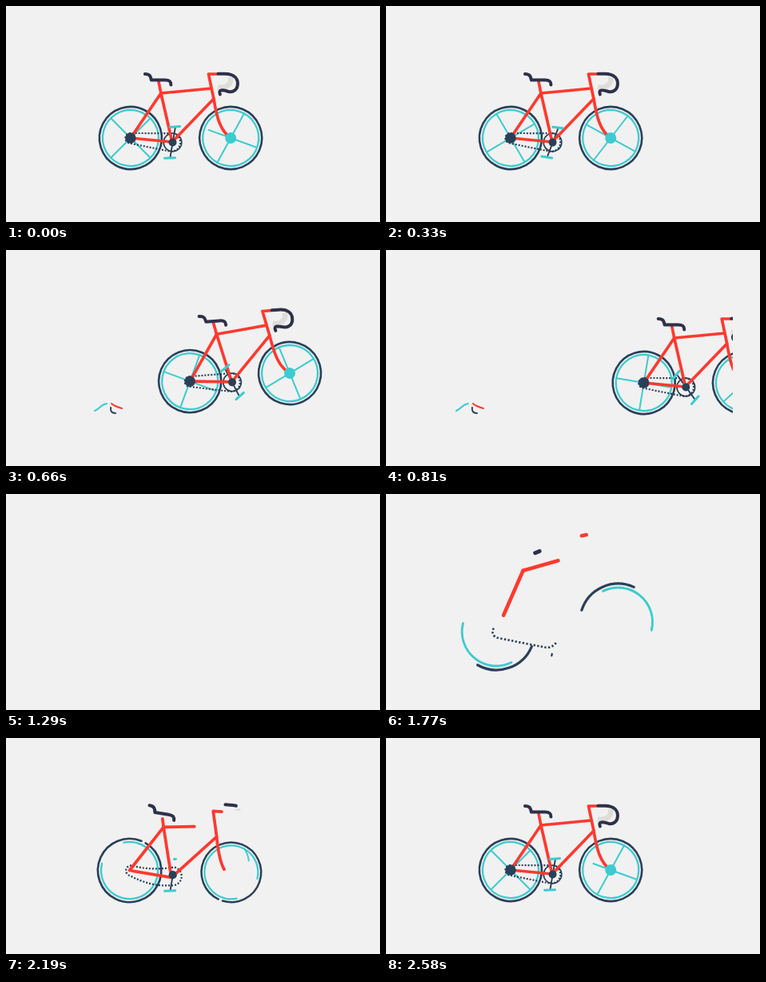
Recreate the animation shown at these times as an HTML page. Size 468x270 px, loop 2610 ms.

```html
<!DOCTYPE html>
<html lang="en">
<head>
<meta charset="utf-8">
<title>Bicycle loop</title>
<style>
  html, body { margin: 0; width: 100%; height: 100%; overflow: hidden; background: #f1f1f1; }
  svg { display: block; width: 468px; height: 270px; clip-path: inset(0 34px); }
  path { fill: none; stroke-linecap: round; stroke-linejoin: round; }
</style>
</head>
<body>
<svg id="stage" viewBox="0 0 468 270"></svg>
<script>
const LOOP = 2610, REBUILD = 1290;
const RED = '#ff392e', TEAL = '#3ccbd0', NAVY = '#2a4059', DARK = '#2e314a', GREY = '#dfddd9';

const { PI, sin, cos, max, min, exp, round } = Math;
const clamp = v => min(1, max(0, v));
const ramp = (t, at, time) => clamp((t - at) / time);
const ease = (t, at, time) => {
  const u = ramp(t, at, time);
  return u * u * (3 - 2 * u);
};
const pop = (t, at, time) => {
  const u = ramp(t, at, time) - 1;
  return 1 + 2.7 * u ** 3 + 1.7 * u ** 2;
};
const decay = (t, time) => exp(-((max(0, t) / time) ** 3));

function add(parent, tag, attrs = {}) {
  const el = document.createElementNS('http://www.w3.org/2000/svg', tag);
  for (const name in attrs) el.setAttribute(name, attrs[name]);
  return parent.appendChild(el);
}
const group = parent => add(parent, 'g');
const line = (parent, stroke, width, d = '') =>
  add(parent, 'path', { d, stroke, 'stroke-width': width, pathLength: 1 });
const place = (el, x, y, rot = 0, sx = 1, sy = sx) =>
  el.setAttribute('transform', `translate(${x} ${y}) rotate(${rot}) scale(${sx} ${sy})`);

function trim(el, a, b) {
  const full = b - a > 0.999;
  el.style.display = b - a < 0.004 ? 'none' : '';
  el.style.strokeDasharray = full ? 'none' : `${b - a} 3`;
  el.style.strokeDashoffset = full ? 0 : -a;
}

// A stroke that grows out of the point `seed` (0..1) towards both ends.
const strokes = [];
function grow(el, at, time, seed = 0, rate = ease) {
  strokes.push({ el, at, time, seed, rate });
  return el;
}
function drawStrokes(t) {
  for (const { el, at, time, seed, rate } of strokes) {
    const g = rate(t, at, time);
    trim(el, seed * (1 - g), seed + (1 - seed) * g);
  }
}

// An arc that grows around `deg`, `back` being the share drawn backwards.
function arc(el, r, deg, back, g) {
  const a = deg - 360 * back * g, b = deg + 360 * (1 - back) * g;
  const at = d => `${r * cos(d * PI / 180)} ${r * sin(d * PI / 180)}`;
  const to = d => `A${r} ${r} 0 0 1 ${at(d)}`;
  el.style.display = g < 0.004 ? 'none' : '';
  el.setAttribute('d', `M${at(a)}${to((a + b) / 2)}${to(b)}`);
}

const stage = document.getElementById('stage');
const sparks = group(stage);
const sparkLines = [
  line(sparks, TEAL, 2, 'M-17 1Q-13 -1 -10 -4T-2 -8'),
  line(sparks, NAVY, 2, 'M3 -3Q2 4 9 4'),
  line(sparks, RED, 2, 'M4 -8Q7 -5 17 -2')
];
const bike = group(stage);

function wheel() {
  const g = group(bike), spin = group(g);
  return {
    g, spin,
    spokes: [line(spin, TEAL, 2), line(spin, TEAL, 2)],
    tyre: line(g, NAVY, 2.6), rim: line(g, TEAL, 2.3)
  };
}
const rear = wheel(), front = wheel();
grow(rear.spokes[0], 2220, 210);
grow(rear.spokes[1], 2260, 240);
grow(front.spokes[0], 2120, 240);
grow(front.spokes[1], 2330, 340);

const chain = group(bike);
const links = add(chain, 'path', { stroke: NAVY, 'stroke-width': 2.2, pathLength: 160 });
links.style.strokeLinecap = 'butt';

const crank = group(bike), ring = line(crank, NAVY, 1.7);
grow(line(crank, NAVY, 1.9, 'M-3 18.5L3.3 -18.5'), 1730, 840, 0, ramp);

const frame = group(bike), body = group(frame);
body.setAttribute('transform', 'translate(-156 -165)');
const tube = (d, ...timing) => grow(line(body, RED, 3.7, d), ...timing);
tube('M194 109L156 165', 1440, 500);
tube('M194 109L231 105.5', 1440, 320);
tube('M231 105.5L257 103', 2170, 200);
tube('M191 94L194 109L208 170L156 165', 1800, 460, .6);
tube('M208 170L260 116', 1850, 300);
tube('M264 85H253.5L260 116C264 140 268 155 281 165', 1680, 665);

const seat = group(body);
grow(line(seat, DARK, 4, 'M-18 -7.5C-12 -7.5 -11 -5 -10 0H7C13 0 14.5 2 14.5 6'), 1700, 330, .48);
const bars = group(body);
const hood = grow(line(bars, GREY, 6.5, 'M281 89C283 97 276 104 265 101.5'), 2140, 280);
hood.style.strokeLinecap = 'butt';
grow(line(bars, DARK, 4,
  'M265.5 84.8H274C286 85 290 91 290 97C290 105 284 108 279 107C273 105.5 265 103 268 110.5'), 2110, 280);

const pedals = group(bike);
grow(line(pedals, TEAL, 3, 'M-10 19.8L3 19.2'), 1900, 220);
grow(line(pedals, TEAL, 3, 'M-3.5 -19L9 -20'), 2160, 130, .5);

const disc = (parent, fill) => add(parent, 'circle', { fill });
const rearHub = disc(rear.hub = group(bike), NAVY);
const frontHub = disc(front.hub = group(bike), TEAL);
const axle = disc(pedals, NAVY);

function drawWheel(w, t, x, y, s, turn, tyreAt, rimAt) {
  place(w.g, x, y, 0, s);
  place(w.hub, x, y, 0, s);
  w.spin.setAttribute('transform', `rotate(${turn})`);
  arc(w.tyre, 39, tyreAt, .323, ease(t, 1520, 738));
  arc(w.rim, 35, rimAt, 1, ramp(t, 1441, 913));
}

// A spoke runs right across the hub; `bend` bows it sideways.
const setSpoke = (el, x, y, bend = 0) =>
  el.setAttribute('d', `M${x} ${y}Q${bend} 0 ${-x} ${-y}`);
setSpoke(rear.spokes[0], 24.5, -24.5);
setSpoke(rear.spokes[1], -24.5, -24.5);
setSpoke(front.spokes[1], 33, 12);

function drawChain(t, sag, turn) {
  links.setAttribute('d', `M0 -6A6.3 6.3 0 0 0 -1.3 6.5Q25 ${12 + sag * 1.3} 49.5 16.7` +
    `A11.3 11.3 0 0 0 52.5 -5.8Q26 ${sag - 6} 0 -6`);
  const n = round(39 * ease(t, 1390, 760)), full = n > 38;
  links.style.display = n < 1 ? 'none' : '';
  links.style.strokeDasharray = full ? '2 2' : '2 2 '.repeat(max(0, n - 1)) + '2 400';
  links.style.strokeDashoffset = full ? turn * PI / 180 * 11.3 % 4 : -6;
}

function drawSparks(t) {
  const k = ease(t, 400, 200), gone = ease(t, 1020, 220);
  sparks.style.display = t < 455 ? 'none' : '';
  place(sparks, 105 - .155 * (t - 810) - 16 * (1 - k), 200 + 2 * (1 - k), 0, k, 2 * k - 1);
  sparkLines.forEach(el => trim(el, gone, 1));
}

function draw(t) {
  // Riding off.
  const ride = t < REBUILD ? t : 0;
  const spin = (deg, power) => deg * (ride / 810) ** power;
  const hump = sin(PI * ramp(ride, 350, 460)) ** 2;
  const dx = .00082 * max(0, ride - 360) ** 2;
  const dy = ease(ride, 600, 200) - 1.5 * hump;
  bike.setAttribute('transform', `translate(${dx} ${dy}) rotate(${-6.4 * hump} 156 165)`);

  // Assembling: the clock runs on past the loop point so late strokes can finish.
  const b = t < REBUILD ? t + LOOP : t;
  const big = decay(b - 1400, 554);
  const late = max(0, b - 1770);
  const swing = decay(late, 430) * cos(PI * late / 440);
  const sag = 15 * decay(late, 430) * sin(PI * late / 840);
  const s = 1 + .31 * big;

  const rx = 155.9 - 24 * big, ry = 165 + 9.4 * big;
  drawWheel(rear, b, rx, ry, s, spin(323, 3.46), 54, 194);
  drawWheel(front, b, 281.2 + 12.5 * big, 165 - 7 * swing + 2.7 * big,
    1 + .13 * swing + .134 * big, spin(296, 3.92), 229, 374);
  setSpoke(front.spokes[0], 17, -31, 6.5 * sag);

  const turn = spin(313, 3.71);
  place(chain, rx + 4 * big + sag / 3, ry, sag / 3, 1 + .25 * big);
  drawChain(b, sag, turn);

  const cx = 208.5 + 3.4 * big, cy = 170.5 + 12 * big;
  place(crank, cx, cy, turn, s);
  place(pedals, cx, cy, turn, s);
  arc(ring, 11.3, -90, 0, ease(b, 2220, 230));

  place(frame, rx, ry, -10.5 * swing, s);
  place(seat, 192 + 41 * big ** 2, 92.5, -12 * swing);
  place(bars, .4 * sag, -1.5 * sag);
  drawStrokes(b);

  rearHub.setAttribute('r', max(0, 6.8 * pop(b, 2220, 210)));
  frontHub.setAttribute('r', max(0, 7 * pop(b, 2260, 210)));
  axle.setAttribute('r', 5 * ease(b, 2080, 110));

  drawSparks(t);
}

const start = performance.now();
function tick() {
  draw((performance.now() - start) % LOOP);
  requestAnimationFrame(tick);
}
tick();
</script>
</body>
</html>
```
